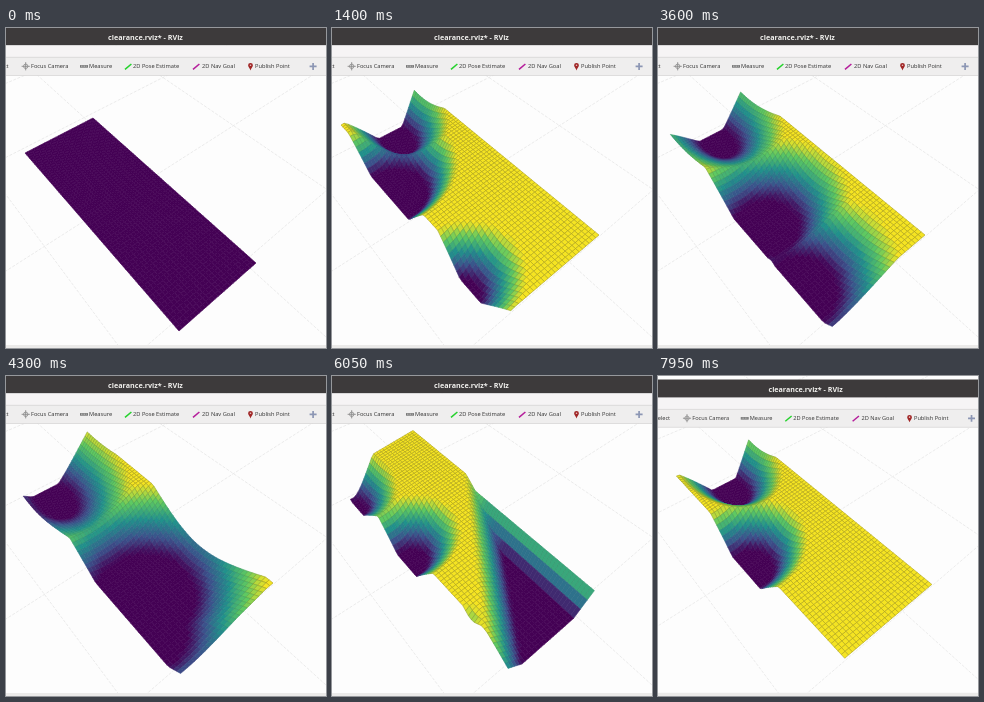
Recreate the animation shown at these times as an HTML page with a canvas. Size 320x320 px, loop 8000 ms.

```html
<!DOCTYPE html>
<html lang="en">
<head>
<meta charset="utf-8">
<title>Clearance surface</title>
<style>
  html, body { margin: 0; width: 100%; height: 100%; overflow: hidden; background: #fdfdfd; }
  canvas, svg { position: absolute; inset: 0; width: 100%; height: 100%; display: block; }
  text { font: 5.7px "Open Sans", "Noto Sans", sans-serif; fill: #303030; }
  .title { font-size: 7.2px; font-weight: 700; fill: #f2f1ee; text-anchor: middle; }
</style>
</head>
<body>
<canvas id="scene"></canvas>
<svg viewBox="0 0 320 320">
  <g id="chrome">
    <rect x="-20" y="-1" width="370" height="18.4" fill="#3d3a3b"/>
    <rect x="-20" y="17.4" width="370" height="11.6" fill="#f6f4f5"/>
    <rect x="-20" y="29" width="370" height="18.5" fill="#efeeee"/>
    <path d="M-20 29.3H350M-20 47.5H350" stroke="#d5d3d3" stroke-width=".7"/>
    <rect x="-20" y="317" width="370" height="12" fill="#ebeae9"/>
    <text class="title" x="139.5" y="11.6">clearance.rviz* - RViz</text>
    <text x="2.6" y="40.4" text-anchor="end">Select</text>
    <text x="25" y="40.4">Focus Camera</text>
    <text x="83" y="40.4">Measure</text>
    <text x="127" y="40.4">2D Pose Estimate</text>
    <text x="196" y="40.4">2D Nav Goal</text>
    <text x="249" y="40.4">Publish Point</text>
    <g fill="none" stroke="#8b8b8b">
      <circle cx="19.7" cy="38.3" r="2.2" stroke-width=".8"/>
      <path d="M15.6 38.3h8.2M19.7 34.2v8.2" stroke-width=".9"/>
      <path d="M74 38.4h8" stroke="#777" stroke-width="2.6"/>
      <path d="M75 38.2h6.4" stroke="#d8d8d8" stroke-dasharray=".8 .8"/>
      <path d="M119 41.4l6.4-5.4" stroke="#25d22d" stroke-width="1.5"/>
      <path d="M187 41.4l6.4-5.4" stroke="#b51d9b" stroke-width="1.5"/>
      <path d="M303.6 38.4h7M307.1 34.9v7" stroke="#8c96b4" stroke-width="1.7"/>
    </g>
    <path d="M244.5 42.4c-.5-2-2.4-3.2-2.4-5.1a2.4 2.4 0 0 1 4.8 0c0 1.9-1.9 3.1-2.4 5.1z" fill="#a02525"/>
    <circle cx="244.5" cy="37.2" r=".8" fill="#e8c8c8"/>
  </g>
</svg>
<script>
// Times are in seconds.
const DURATION = 8, STEP = 0.05, VIEW_CUT = 7.25;
const COLS = 70, ROWS = 25, LEVELS = 40;
const VIRIDIS = [[68, 1, 84], [59, 82, 139], [33, 145, 140], [94, 201, 98], [245, 228, 34]];

const mix = (a, b, k) => a + (b - a) * k;
const clamp = x => Math.min(1, Math.max(0, x));
const pulse = (t, at, width) => Math.exp(-(((t - at) / width) ** 2));

// Perspective map from the unit square to corners at (0,0), (1,0), (1,1), (0,1).
function quadMap([p, q, r, s]) {
  const [ax, ay] = [q[0] - r[0], q[1] - r[1]];
  const [bx, by] = [s[0] - r[0], s[1] - r[1]];
  const [cx, cy] = [p[0] - q[0] + r[0] - s[0], p[1] - q[1] + r[1] - s[1]];
  const det = ax * by - bx * ay;
  const g = (cx * by - bx * cy) / det, h = (ax * cy - cx * ay) / det;
  return (u, v) => [0, 1].map(i =>
    ((q[i] - p[i] + g * q[i]) * u + (s[i] - p[i] + h * s[i]) * v + p[i]) / (1 + g * u + h * v));
}
const ground = quadMap([[19, 125], [173, 303], [250, 235], [87, 90]]);
const plateau = quadMap([[9, 97], [179, 282], [267, 207], [81, 54.5]]);

// Three drifting hollows and a wedge that sweeps in from the right corner.
function heightAt(t) {
  if (t < STEP) return () => 0;
  const surge = pulse(t, 4.3, 1), dip = pulse(t, 5, 0.6), swing = pulse(t, 5.5, 1.3);
  const slope = 8 + 5 * surge;
  const end = { x: 4 + 6 * dip, y: 14 - 16 * swing, r: 5 + 2.5 * dip - 3 * pulse(t, 6.1, 0.5), stretch: 0.6 };
  const middle = {
    x: 20 + 1.7 * t + 22 * surge,
    y: 1 + 6 * surge,
    r: 7 + 3 * Math.cos(2 * Math.PI * (t - 1.4) / 2.9) + 3 * surge
  };
  const near = {
    x: 58 + 8 * pulse(t, 2.65, 0.6),
    y: -2 + 4 * surge,
    r: 9 - 5 * pulse(t, 1.2, 0.8) - 35 * pulse(t, 7.4, 1.4)
  };
  const hollows = [end, middle, near];
  const wedgeStart = 43 + 45 * (1 - pulse(t, 6.05, 0.7));
  return (i, j) => {
    const wedge = Math.max(wedgeStart - 0.555 * i - 0.832 * j, 2 * (j - 22));
    const gaps = hollows.map(({ x, y, r, stretch = 1 }) => Math.hypot((i - x) * stretch, j - y) - r);
    return clamp(Math.min(wedge, ...gaps) / slope);
  };
}

function shade(h, dim = 1) {
  const x = h * (VIRIDIS.length - 1), i = Math.min(VIRIDIS.length - 2, Math.floor(x));
  return `rgb(${VIRIDIS[i].map((c, n) => Math.round(mix(c, VIRIDIS[i + 1][n], x - i) * dim))})`;
}
const ramp = dim => Array.from({ length: LEVELS + 1 }, (_, i) => shade(i / LEVELS, dim(i / LEVELS)));
const FILLS = ramp(() => 1), LINES = ramp(h => 1 - 0.3 * h * h);

const nodes = [];
for (let i = 0; i <= COLS; i++)
  for (let j = 0; j <= ROWS; j++)
    nodes.push({ i, j, low: ground(i / COLS, j / ROWS), high: plateau(i / COLS, j / ROWS) });
const nodeAt = (i, j) => nodes[i * (ROWS + 1) + j];

const canvas = document.getElementById("scene"), ctx = canvas.getContext("2d");
const chrome = document.getElementById("chrome");

function trace(points) {
  ctx.beginPath();
  points.forEach(([x, y]) => ctx.lineTo(x, y));
}

function drawFloor() {
  ctx.strokeStyle = "#e3e3e3";
  ctx.lineWidth = 0.7;
  ctx.setLineDash([3, 1.5]);
  for (let k = -2; k < 3; k++) {
    const u = 0.47 + 0.5 * k, v = -0.47 + 1.385 * k;
    trace([ground(u, -3), ground(u, 5)]);
    ctx.stroke();
    trace([ground(-2, v), ground(2, v)]);
    ctx.stroke();
  }
  ctx.setLineDash([]);
}

// Cells are painted from the far side to the near side.
function drawSurface(height) {
  for (const p of nodes) {
    p.h = height(p.i, p.j);
    p.at = p.low.map((low, n) => mix(low, p.high[n], p.h));
  }
  ctx.lineWidth = 0.6;
  ctx.lineJoin = "round";
  for (let j = ROWS - 1; j >= 0; j--)
    for (let i = 0; i < COLS; i++) {
      const cell = [nodeAt(i, j), nodeAt(i + 1, j), nodeAt(i + 1, j + 1), nodeAt(i, j + 1)];
      const level = Math.round(cell.reduce((sum, p) => sum + p.h, 0) / 4 * LEVELS);
      trace(cell.map(p => p.at));
      ctx.closePath();
      ctx.fillStyle = FILLS[level];
      ctx.strokeStyle = LINES[level];
      ctx.fill();
      ctx.stroke();
    }
}

function render(t) {
  const wide = Math.round(innerWidth * devicePixelRatio), tall = Math.round(innerHeight * devicePixelRatio);
  if (canvas.width !== wide || canvas.height !== tall) Object.assign(canvas, { width: wide, height: tall });
  const view = t < VIEW_CUT ? [1, 0, 0, 1, 0, 0] : [0.99, 0, 0, 0.985, 9.5, 4.5];
  chrome.setAttribute("transform", `matrix(${view})`);
  ctx.setTransform(wide / 320, 0, 0, tall / 320, 0, 0);
  ctx.fillStyle = "#fdfdfd";
  ctx.fillRect(0, 0, 320, 320);
  ctx.transform(...view);
  drawFloor();
  drawSurface(heightAt(t));
}

const start = performance.now();
let shown = -1;
function tick() {
  const step = Math.floor((performance.now() - start) / 1000 % DURATION / STEP);
  if (step !== shown) render((shown = step) * STEP);
  requestAnimationFrame(tick);
}
tick();
</script>
</body>
</html>
```
